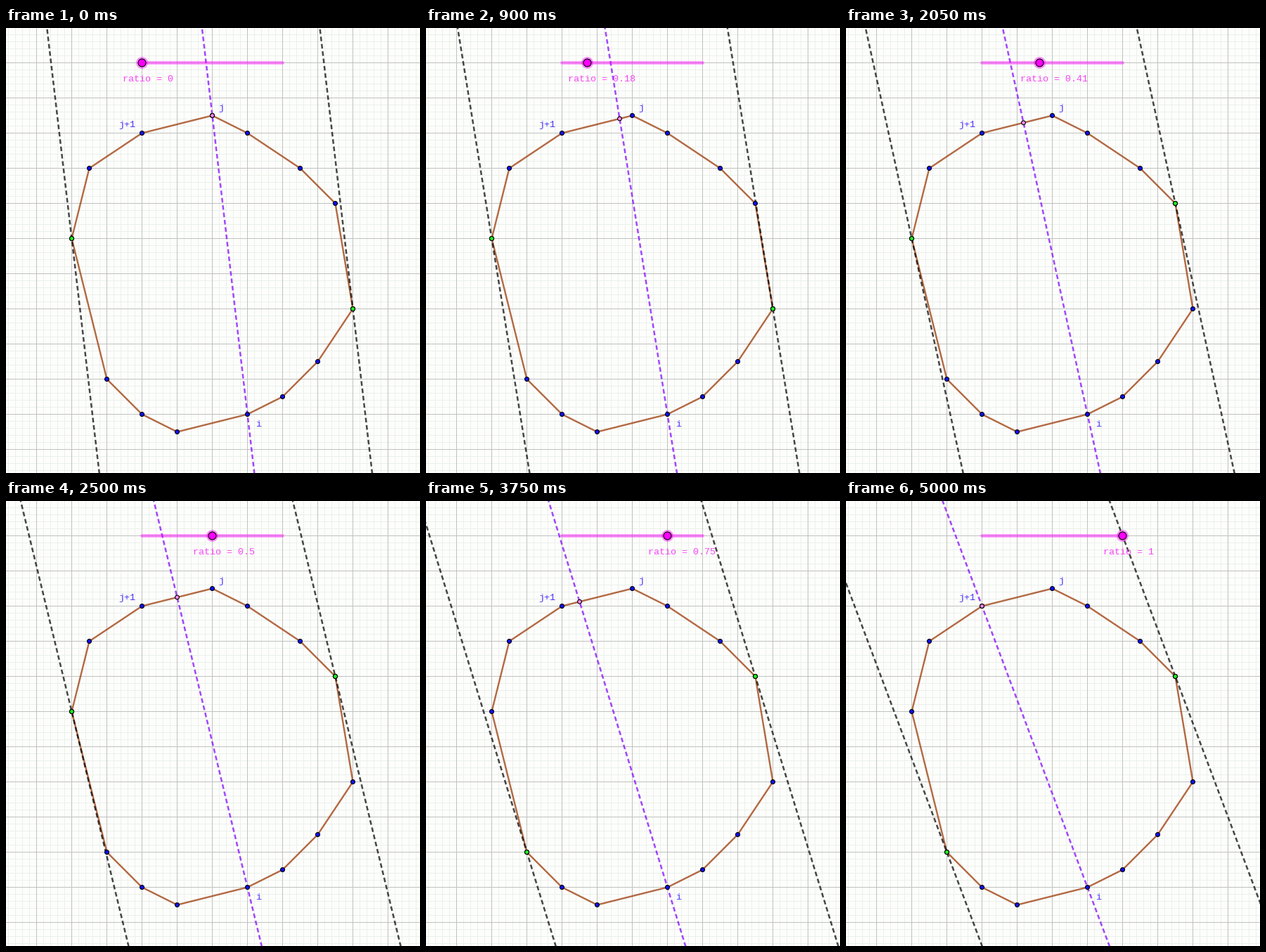
Animation, 589 px wide and 633 px high, one loop 5500 ms. Source, as a matplotlib script:

```python
import numpy as np
import matplotlib.pyplot as plt
from matplotlib.animation import FuncAnimation
from matplotlib.patches import Circle

W, H = 589, 633
DPI = 64
PX = 72 / DPI  # points per pixel
FRAMES, INTERVAL = 110, 50
LAST_STEP = 100
MARGIN = 5  # long lines run this far past the stage

plt.rcParams["lines.scale_dashes"] = False
plt.rcParams["font.family"] = "Liberation Mono"

# Grid cells are 50 px wide, counted from this corner.
CELL = 50
ORIGIN = np.array([43.5, 49.5])
HULL = ORIGIN + CELL * np.array([
    (5, 1.5), (6, 2), (7.5, 3), (8.5, 4), (9, 7), (8, 8.5), (7, 9.5),
    (6, 10), (4, 10.5), (3, 10), (2, 9), (1, 5), (1.5, 3), (3, 2),
])
J, J_NEXT, I = HULL[0], HULL[-1], HULL[7]

SLIDER_X, SLIDER_Y, SLIDER_LEN = 193.5, 49.5, 200

BLUE, GREEN, PINK, MAGENTA = "#0d0df5", "#1eee1e", "#f58af0", "#ff00ff"
LABEL = "#4a34fa"

fig = plt.figure(figsize=(W / DPI, H / DPI), dpi=DPI, facecolor="#fdfefc")
ax = fig.add_axes([0, 0, 1, 1])
ax.set_xlim(0, W)
ax.set_ylim(H, 0)
ax.axis("off")


def draw_grid(step, color, z):
    style = dict(colors=color, linewidths=PX, zorder=z, snap=False)
    ax.vlines(np.arange(ORIGIN[0] % step, W, step), 0, H, **style)
    ax.hlines(np.arange(ORIGIN[1] % step, H, step), 0, W, **style)


def stroke(x, y, color, width, z, **style):
    return ax.plot(x, y, color=color, lw=width * PX, zorder=z, snap=False,
                   **style)[0]


def dashed(color):
    return stroke([], [], color, 2.5, 4, alpha=0.72,
                  ls=(0, (6.5 * PX, 4 * PX)))


def dot(center, color, radius, z, edge="black", **style):
    return ax.add_patch(Circle(center, radius, fc=color, ec=edge,
                               lw=1.1 * PX, zorder=z, **style))


def label(x, y, text, color):
    return ax.text(x, y, text, color=color, fontsize=13.33 * PX,
                   va="baseline", ha="left", zorder=8)


draw_grid(10, "#ebf0ea", 0)
draw_grid(CELL, "#c0c2c0", 1)

outline = np.vstack([HULL, HULL[:1]])
stroke(*outline.T, "#993300", 2.4, 3, alpha=0.73, solid_joinstyle="round")

chord = dashed("#8000ff")
supports = [dashed("black"), dashed("black")]

stroke([SLIDER_X, SLIDER_X + SLIDER_LEN], [SLIDER_Y] * 2, MAGENTA, 4.6, 5,
       alpha=0.46, solid_capstyle="round")
halo = dot((0, 0), MAGENTA, 8.5, 5, edge="none", alpha=0.42)
knob = dot((0, 0), MAGENTA, 5.5, 6)

for vertex in HULL:
    dot(vertex, BLUE, 3, 6)
touching = [dot((0, 0), GREEN, 3, 7) for _ in supports]
target = dot((0, 0), PINK, 2.9, 7)

label(160, 141, "j+1", LABEL)
label(302, 117, "j", LABEL)
label(355, 567, "i", LABEL)
readout = label(0, 76, "", "#f745f7")


def set_line(line, point, slope):
    """Run the line upwards across the stage; slope is dx per dy."""
    right_exit = point[1] + (W + MARGIN - point[0]) / slope
    y = np.array([min(H + MARGIN, right_exit), -MARGIN])
    line.set_data(point[0] + (y - point[1]) * slope, y)


def update(frame):
    step = min(frame, LAST_STEP)
    ratio = step / LAST_STEP

    tip = J + (J_NEXT - J) * ratio
    slope = (tip[0] - I[0]) / (tip[1] - I[1])
    offset = HULL[:, 0] - slope * HULL[:, 1]
    extremes = HULL[[offset.argmin(), offset.argmax()]]

    set_line(chord, I, slope)
    for line, mark, point in zip(supports, touching, extremes):
        set_line(line, point, slope)
        mark.center = point
    target.center = tip

    x = SLIDER_X + SLIDER_LEN * ratio
    halo.center = knob.center = (x, SLIDER_Y)
    readout.set_x(x - 27)
    readout.set_text(f"ratio = {ratio:g}")
    return chord, *supports, *touching, target, halo, knob, readout


anim = FuncAnimation(fig, update, frames=FRAMES, interval=INTERVAL,
                     repeat=True, repeat_delay=0, blit=False)
plt.show()
```
